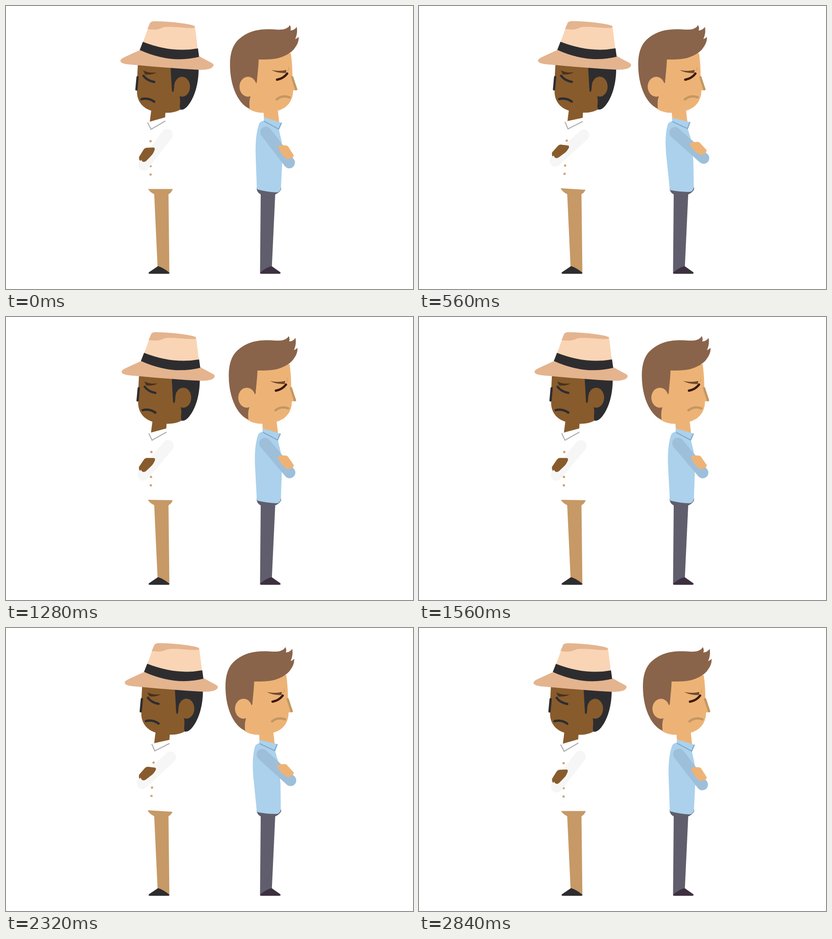
Animation, 898 px wide and 624 px high, one loop 2.88 s. Source, as an HTML page:

```html
<!DOCTYPE html>
<html lang="en">
<head>
<meta charset="utf-8">
<title>Back to back</title>
<style>
  html, body { margin: 0; width: 100%; height: 100%; overflow: hidden; background: #fff; }
  svg { display: block; width: 100%; height: 100%; }
  .line { fill: none; stroke-width: 5; stroke-linecap: round; }
  .arm { fill: none; stroke-width: 25; stroke-linecap: round; }
  .collar { fill: none; stroke-width: 2.2; }
</style>
</head>
<body>
<svg viewBox="0 0 898 624">
  <g id="hatMan">
    <path fill="#c69966" d="M313 396H368V403.5Q365 412 358.5 415L360.5 588H335L327 415Q317 410 313 403Z"/>
    <path fill="#2d2d30" d="M335.500 573.500Q348 577.500 360.500 588Q361 590.500 358 590.500H317Q313 590 315.500 587Z"/>
    <g class="head">
      <path fill="#885b2c" d="M321 226L316 265H350L352 230Z"/>
      <path fill="#885b2c" d="M291 126L289 165V190C289.500 210 301 225 321 231L352 235.5Q370 236 384 229L392 200V135Z"/>
      <path fill="#2d2d30" d="M363 134L366 187Q368 192.500 370 187L373 166L383 199C386 210 382 220 384.500 228.500Q393 230.500 402 219C417 200 425 170 425 138Z"/>
      <ellipse fill="#885b2c" cx="388.500" cy="178" rx="17.500" ry="22"/>
      <g class="line" stroke="#2d2d30">
        <path d="M290.300 157L287.800 184"/>
        <path d="M303.500 154Q311 164.500 327 167.500"/>
        <path d="M299 205.500Q314 201.500 327 211"/>
      </g>
      <path fill="#49311d" d="M332 146.500Q315 148.500 302.500 142L307 151Q322 152.500 332 146.500Z"/>
      <path fill="#e4b48f" d="M298 96L263 112Q252 117 252.400 121C253 126 262 128 273 129C320 133 380 138.500 427 140.700C448 141 457 137 458 130Q458 127 447 122L425 110Z"/>
      <path fill="#f9d5b5" d="M318 37L302 80L330 102H424L417 46Z"/>
      <path fill="#e4b48f" d="M318 37Q321 33 330 33.500C360 34 400 38 416 44Q418 47 414 48.500C395 49.500 365 44 347 47Q335 53 325 52L312 51Z"/>
      <path fill="#2d2d30" d="M302 79Q366 104 423.500 93.500L426 112Q364 128 295 97Z"/>
    </g>
    <g class="torso">
      <path fill="#fff" d="M300 260L317.500 255L351 245.500L380 250L385 380L372 403.500H308L300 380Z"/>
      <path class="collar" stroke="#adadad" d="M312.500 257L320 272L351.500 253.500"/>
      <g fill="#d2a37b">
        <circle cx="319" cy="298" r="2.600"/>
        <circle cx="319" cy="353" r="2.600"/>
        <circle cx="319" cy="371.500" r="2.600"/>
      </g>
      <g class="forearm">
        <path class="arm" stroke="#f6f6f6" d="M355.500 283.500L304 350.500"/>
        <path fill="#885b2c" d="M293.500 333L303 317.500Q306 312.500 311 312.500L326 312Q329 313 328 317Q325 326 320 330.500L309.500 341.500Q304 346 300 342L298 339L296 342Q293 338 293.500 333Z"/>
      </g>
    </g>
  </g>
  <g id="shirtMan">
    <path fill="#605e6c" d="M553 400H607V404Q604 411 594 415.500L586 588H560.500L562 415.500Q555 412 553 404Z"/>
    <path fill="#3d3040" d="M586 573.500L604.500 586.500Q608 590 603 590.500H563Q560.500 590.500 560.500 588Q572 577.500 586 573.500Z"/>
    <g class="head">
      <path fill="#edb376" d="M568 228H599.500L603.500 262H570Z"/>
      <path fill="#edb376" d="M535 110L628.500 104Q632 130 632 155L643 183Q643 186 639 186H633.500C633.500 208 622 224 601 230.500L568 235.500Q550 236 536 227Z"/>
      <path fill="#89644a" d="M494.200 130C494 105 500 86 513 74C535 54 560 50 590 51.500Q607 53 614 51Q624 48 626 42Q630 47 627.500 54Q637 53 641.500 46Q644 60 638 73Q642 72 645.700 68Q647 80 637 93Q628 106 604 114Q590 118.500 557.500 118C557 135 555 150 553.500 168Q551.500 173 550 168L540 198C536 210 537 216 537.500 226.500C512 215.500 494.500 177 494.200 130Z"/>
      <ellipse fill="#edb376" cx="534" cy="178" rx="18.800" ry="22"/>
      <path class="line" stroke="#c29762" stroke-linecap="butt" d="M631.500 157L640 183.500"/>
      <path class="line" stroke="#3a1a0c" d="M598 162.500Q612 160 620.500 149"/>
      <path class="line" stroke="#c29762" d="M597 206Q610 195.500 625.500 201.500"/>
      <path fill="#70492f" d="M585.500 141Q603 145 618.500 141L618 147.500Q600 149 585.500 141Z"/>
      <path fill="none" stroke="#c29762" d="M623.500 134.500Q626 139 621 144"/>
    </g>
    <g class="torso">
      <path fill="#abd1ec" d="M569.500 245.500L602 255.500L609 258L602.500 273L605 285Q609 298 609 315L609.500 345L606.500 403Q603 411 597 411Q575 410 553.500 404L550.700 325Q550 283 558.500 260Q561 254 568.500 253Z"/>
      <path class="collar" stroke="#7fa9cb" d="M569.500 254L601.500 271.500L608 257.500"/>
      <g class="forearm">
        <path class="arm" stroke="#9ebfd9" d="M573.500 278.500L625 345.500"/>
        <path fill="#edb376" d="M600 308.500Q608 306 618 307.500Q622 308 624 312L634 328Q636 331 633 333Q633 336 627 335.500Q622 340 618 336L611 329Q607 326 604 318Z"/>
      </g>
    </g>
  </g>
</svg>
<script>
  const LOOP = 2880, SWAY = 1425, UNIT = 560;

  const people = [
    { id: 'hatMan', hip: [340, 404], neck: [332, 250], shoulder: [355.5, 283.5], lean: 3.75, swing: 6.2 },
    { id: 'shirtMan', hip: [580, 405], neck: [586, 250], shoulder: [573.5, 278.5], lean: -3.9, swing: -6.8 }
  ].map(person => {
    const part = name => document.querySelector(`#${person.id} .${name}`);
    return { ...person, head: part('head'), torso: part('torso'), arm: part('forearm') };
  });

  const rotate = (node, angle, [x, y]) => node.setAttribute('transform', `rotate(${angle} ${x} ${y})`);

  // The head follows the neck without tilting.
  function pose(person, amount) {
    const { hip, neck, shoulder, lean, swing } = person;
    const angle = lean * amount * Math.PI / 180;
    const x = neck[0] - hip[0], y = neck[1] - hip[1];
    const dx = x * Math.cos(angle) - y * Math.sin(angle) - x;
    const dy = x * Math.sin(angle) + y * Math.cos(angle) - y;
    person.head.setAttribute('transform', `translate(${dx} ${dy})`);
    rotate(person.torso, lean * amount, hip);
    rotate(person.arm, swing * amount, shoulder);
  }

  // Two even sways, then a short rest upright before the loop restarts.
  function draw(now) {
    const time = Math.min(now % LOOP, 2 * SWAY) % SWAY;
    const amount = Math.min(time, SWAY - time) / UNIT;
    people.forEach(person => pose(person, amount));
    requestAnimationFrame(draw);
  }

  draw(0);
</script>
</body>
</html>
```
